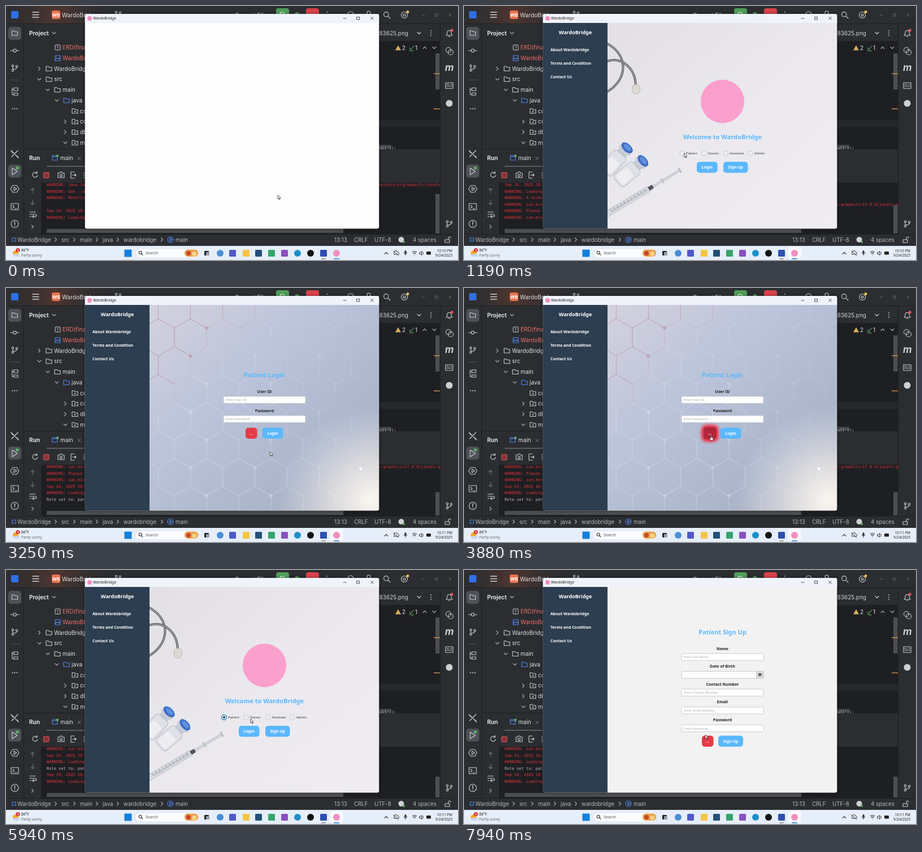
An HTML page for the animation above (8 s loop, 800 by 450 pixels).

```html
<!DOCTYPE html>
<html lang="en">
<head>
<meta charset="utf-8">
<title>WardoBridge demo</title>
<style>
html, body { margin: 0; width: 100%; height: 100%; overflow: hidden; background: #1e1f22; }
svg { display: block; width: 100vw; height: 100vh; }
text { white-space: pre; }
.ide { font-family: Inter, sans-serif; }
.app { font-family: "Noto Sans", "Open Sans", sans-serif; }
.mono { font-family: "DejaVu Sans Mono", monospace; font-size: 7px; }
</style>
</head>
<body>
<svg id="stage" viewBox="0 0 800 450"></svg>
<script>
const LOOP = 8000, NAME = "WardoBridge", BLUE = "#5bb8ff", GREY = "#ced0d6";

const rect = (x, y, w, h, fill, r = 0, more = "") =>
  `<rect x="${x}" y="${y}" width="${w}" height="${h}" rx="${r}" fill="${fill}" ${more}/>`;
const dot = (x, y, r, fill, more = "") => `<circle cx="${x}" cy="${y}" r="${r}" fill="${fill}" ${more}/>`;
const line = (d, color = GREY, w = 1.1, more = "") =>
  `<path d="${d}" fill="none" stroke="${color}" stroke-width="${w}" stroke-linecap="round" stroke-linejoin="round" ${more}/>`;
const text = (x, y, s, size, fill = "#dfe1e5", more = "") =>
  `<text x="${x}" y="${y}" font-size="${size}" fill="${fill}" ${more}>${s}</text>`;
const bold = (x, y, s, size, fill, more = "") => text(x, y, s, size, fill, 'font-weight="700" ' + more);
const centered = (x, y, s, size, fill) => bold(x, y, s, size, fill, 'text-anchor="middle"');
const group = (id, body, more = "") => `<g id="${id}" ${more}>${body}</g>`;

// Small interface icons, placed by their centre
const ring = (x, y, r, color = GREY) => dot(x, y, r, "none", `stroke="${color}" stroke-width="1.1"`);
const chevron = (x, y, dir = "right", color = "#a8abb2") => line({
  right: `M${x - 1.5} ${y - 3}l3 3l-3 3`, down: `M${x - 3} ${y - 1.5}l3 3l3-3`, up: `M${x - 3} ${y + 1.5}l3-3l3 3`
}[dir], color);
const dots = (x, y, vertical) => [-4, 0, 4].map(d => vertical ? dot(x, y + d, 0.9, GREY) : dot(x + d, y, 1.1, GREY)).join("");
const folder = (x, y, color = GREY) => line(`M${x - 5} ${y - 4}h4l1.5 1.7h4.5v6.3h-10z`, color);
const magnifier = (x, y, s, color = GREY) =>
  ring(x - s / 5, y - s / 5, s * 0.7, color) + line(`M${x + s * 0.35} ${y + s * 0.35}L${x + s} ${y + s}`, color);
const branch = (x, y) => ring(x - 3, y - 4, 1.7) + ring(x - 3, y + 4, 1.7) + ring(x + 4, y - 3, 1.7) +
  line(`M${x - 3} ${y - 2}v4M${x + 4} ${y - 1}q0 3-6 3`);

function ideFrame() {
  const panel = "#2b2d30", edge = "#1e1f22";
  let s = rect(0, 0, 800, 426, panel) + rect(0, 0, 260, 31, "url(#tint)") + rect(660, 62, 108, 191, edge) +
    rect(63, 313, 705, 91, edge) + rect(660, 202, 108, 12, "#26282e");
  s += line("M0 31.5H800M31.5 32V404M768.5 32V404M32 253.5H768M62.5 312V404M0 404.5H800", edge, 1);
  // Top bar
  s += rect(9, 9, 13, 13, "#2f6fe8", 2) + line("M47 11h11M47 15.5h11M47 20h11", GREY, 1.3) +
    rect(81, 8, 15, 15, "#e87450", 3) + centered(88.5, 19, "WB", 8, "#fff") + text(99, 19.5, NAME, 10.2) +
    branch(198, 15) + text(405, 19.5, "Current File", 10.2) + rect(478, 4, 23, 23, "#4f9e58", 4) +
    line("M485 15a4 4 0 1 1 4 4M485 12l4-1", "#fff") + dot(515, 15, 4, "#57965c") + rect(531, 4, 23, 23, "#d9414a", 4) +
    dots(568, 15, true) + ring(610, 15, 5) + ring(642, 12, 3) + magnifier(674, 16, 6) +
    ring(705, 16, 2) + ring(705, 16, 5.5) + dot(711, 10.5, 2.4, "#f2c55c") +
    line("M736 16h5M760 14h4v4h-4zM784 14l4 4m0-4l-4 4", "#696c72", 0.9);
  // Left strip
  s += rect(4, 37, 23, 23, "#4e5157", 5) + folder(15.5, 48) + ring(15.5, 79, 2.7) + line("M8 79h4.5M18.5 79h4.5") +
    branch(15, 110) + line("M8 131h15", "#4e5157") + line("M11 145v12h3M11 148h3M14 145h7v5h-7zM14 154h7v4h-7z") + dots(15.5, 182) +
    line("M10 257l11 11M21 256l-11 11M9 256l3 4M20 266l2 3", GREY, 1.4) + rect(4, 281, 23, 23, "#4e5157", 5) +
    line("M11 287l9 6l-9 6z") + dot(20, 287, 2.8, "#5fad65") +
    line("M12 318h7l4 6l-4 6h-7l-4-6zM14 321l5 3l-5 3z") + line("M9 350h13v11H9zM12 353l2.5 2.5l-2.5 2.5M16 359h3") +
    ring(15.5, 386, 6.5) + line("M15.5 382v5M15.5 389.5v.1", GREY, 1.4);
  // Right strip
  s += line("M779 52h11q-2-2-2-5a3.5 3.5 0 0 0-7 0q0 3-2 5M783 54h3") + dot(789, 43, 2.6, "#e55765") +
    ring(783, 78, 4.5) + ring(787, 82, 4.5) + bold(777, 115, "m", 17, GREY, 'font-style="italic"') +
    line("M778 136h13v10h-13zM780 139h4M780 142h9M787 139h2") + dot(784.5, 172.5, 6, GREY) + branch(784, 386);
  // Project tree
  s += bold(41, 51.5, "Project", 10) + chevron(85, 48, "down");
  s += rect(87, 69, 9, 9, "none", 1, `stroke="${GREY}"`) + text(89.5, 76.5, "?", 7) + text(100, 77, "ERD(final).mdj", 10, "#ef6f69") +
    line("M87 88h9v9h-9zM87 95l3-3l3 2l3-3", "#548af7") + text(100, 96, NAME + ".png", 10, "#ef6f69");
  const rows = [[76, NAME, "right"], [76, "src", "down"], [91, "main", "down"], [107, "java", "down"],
    [122, "config"], [122, "controller", "right"], [122, "db", "right"], [122, "model", "down"]];
  rows.forEach(([x, label, open], i) => {
    const y = 111 + i * 18.75;
    s += folder(x, y, label == "java" ? "#548af7" : GREY) + text(x + 9, y + 3.7, label, 10) + (open ? chevron(x - 17, y, open) : "");
    if (x == 122) s += dot(x, y + 1, 1.2, GREY);
  });
  // Editor edge
  s += text(712, 51.7, "1758683625.png", 10, GREY, 'text-anchor="end"') + chevron(731, 48, "down", GREY) + dots(752, 48, true) +
    `<path d="M689 78.5l5-9l5 9z" fill="#d6ae58"/>` + text(701, 78, "2", 10) + line("M714 74l2.5 3l5-6M714 79q2-2 3 0t4 0", "#5fad65") +
    text(724, 78, "1", 10) + chevron(741, 74, "up") + chevron(758, 74, "down") + rect(760, 84, 7.5, 64, "#4d4e51") +
    rect(757, 119, 11, 1.6, "#b98a4e") + rect(757, 181.5, 11, 1.6, "#b98a4e") + rect(655, 246, 27, 7, "#43454a") +
    text(661, 254, "ull'));", 9, "#bcbec4", 'class="mono"') + rect(655, 254, 113, 6, panel);
  // Run panel
  s += bold(41, 273, "Run", 10) + line("M82 265h9v8h-9zM82 267h9", "#548af7") + dot(91, 265.5, 2.2, "#5fad65") +
    text(96, 273, "main", 10) + line("M127 267.5l5 5m0-5l-5 5", "#8c8f94", 0.9) + rect(72, 283, 110, 2, "#5a5d63") +
    line("M55 296a4.5 4.5 0 1 0 1 4M55 293v3.5h-3.5") + rect(66.5, 295, 9.5, 9.5, "#8a3238", 1, 'stroke="#db5c5c"') +
    line("M92 296h3l1-2h3l1 2h3v8H92z") + ring(97.5, 300, 2) + line("M121 294h-6v11h6M118 299.5h6M122 297.5l2 2l-2 2") + dots(138, 299.5, true);
  s += line("M47 331v-8m-3 3l3-3l3 3M47 344v8m-3-3l3 3l3-3", "#6f737a") +
    line("M42 365h10M42 369h9q3 0 3 2t-3 2h-3M42 373h3M49 371l-2 2l2 2") + chevron(47, 391);
  // Status bar
  s += line("M11 411h6v6h-6z", "#548af7");
  [[20, NAME], [98, "src"], [131, "main"], [171, "java"], [208, NAME.toLowerCase()], [300, "main"],
    [581, "13:13"], [616, "CRLF"], [652, "UTF-8"], [720, "4 spaces"]].forEach(([x, label]) => s += text(x, 417.5, label, 9.7, "#b4b8bf"));
  [88, 121, 161, 198, 276].forEach(x => s += chevron(x, 414));
  s += ring(291, 414, 5, "#548af7") + line("M290 411.5l4 2.5l-4 2.5z", "#548af7") + dot(699.5, 414, 5, GREY) +
    dot(704, 418, 2, "#5fad65") + line("M777 414h8v5h-8zM783 414v-3a2 2 0 0 1 4 0");
  return group("ide", s, 'class="ide"');
}

const stamp = "Sep 24, 2025 10:10:42 PM com.sun", loading = "WARNING: Loading FXML";
const log = ["WARNING: java.lang.System", "WARNING: Use --enable", "WARNING: Restricted", "", stamp, loading,
  "WARNING: A terminally", "WARNING: sun.misc", "WARNING: Please", "WARNING: sun.misc", stamp, loading,
  "Role set to: patient", stamp, loading];

function consolePane() {
  const tail = { 0: "ository/org/openjfx/javafx", 7: "x-graphics/17.0.6/javafx-g" };
  const lines = log.map((s, i) => {
    const y = 319 + i * 11.5, color = s.startsWith("Role") ? "#bcbec4" : "#e2333d";
    return text(72, y, s, 7, color) + (tail[i] ? text(659, y, tail[i], 7, color) : "");
  }).join("");
  return `<g clip-path="url(#console)" class="mono">${group("log", lines)}</g>` +
    rect(72, 395, 525, 7, "#4d4e51") + rect(760, 333, 7.5, 70, "#4d4e51", 0, 'id="thumb"');
}

function taskbar() {
  let s = rect(0, 425, 800, 25, "#e6eef9") + dot(17, 438, 5, "#f5a623") + rect(13, 439, 11, 5, "#c9d6e8", 2.5) +
    dot(21, 432.5, 3.6, "#d13438") + centered(21, 434.7, "1", 5.5, "#fff") + text(27, 435.3, "86°F", 6.5, "#222") +
    text(27, 443.5, "Partly sunny", 6.3, "#666") + rect(209.5, 431.5, 13, 13, "#1480dc", 1) +
    rect(229, 430, 112, 16, "#fbfcfe", 8, 'stroke="#d5dbe6" stroke-width=".6"') + magnifier(238.5, 437.5, 3.6, "#333") +
    text(247, 440.4, "Search", 7, "#555") + rect(316, 431.5, 24, 12.5, "#e9a04c", 6) + dot(323, 438, 4, "#c8452e") + dot(333, 439, 4, "#f4d58a") +
    rect(351, 434, 8, 8, "#222", 1) + rect(354, 436, 6, 6, "#9aa0aa", 1) + rect(573.5, 427, 23, 21, "#f8fafd", 4, 'id="active"');
  ["379 #4b8fd8", "401 #5059c9 sq", "425 #f6c445 sq", "447 #234f78 sq", "470 #36a46a sq", "493 #8a4fc0 sq", "516 #1c8fc9",
    "539 #111", "562 #2e4fae sq", "585 #f08fc0"].forEach(item => {
    const [x, color, square] = item.split(" ");
    s += square ? rect(x - 6, 432, 12, 12, color, 1.5) : dot(x, 438, 6, color);
  });
  s += rect(558, 447, 8, 1.6, "#8b8f98", 0.8) + rect(580, 447, 10, 1.6, "#2d7dd2", 0.8) + chevron(673, 438, "up", "#333") +
    line("M687 440h7a2 2 0 0 0-1-4a3 3 0 0 0-6 1zM686 434l9 8", "#222", 0.9) + rect(705.5, 433, 3, 6, "#333", 1.5) +
    line("M704 437q3 6 6 0M707 440v2", "#333", 0.8) + line("M719.5 436q3.5-3 7 0M721 438.3q2-1.8 4 0M723 440.6v.1", "#222") +
    line("M732 436.5h1.5l2-2v7l-2-2H732zM737.5 435.5q2 2.5 0 5", "#222", 0.9) + rect(744, 435, 8, 5.5, "#222", 1);
  s += text(790, 435.5, "10:10 PM", 6.3, "#222", 'id="clock" text-anchor="end"') + text(790, 443.7, "9/24/2025", 6.3, "#222", 'text-anchor="end"');
  return `<g class="app">${s}</g>`;
}

const button = (x, y, w, label, fill = BLUE) => rect(x, y, w, 19.5, fill, 5) + centered(x + w / 2, y + 12.3, label, 7, "#fff");
const field = (y, label, hint) => centered(457.5, y - 6.3, label, 7, "#222") +
  rect(385, y, 145, 12.3, "#fff", 1.5, 'stroke="#bfc1c6" stroke-width=".8"') + text(389, y + 8.3, hint, 5.8, "#a9abb0");
const hoverButton = (id, x, y, w, label, fill, glow) => group(id,
  rect(x - 5, y - 5, w + 10, 30, glow, 9, 'filter="url(#glow)"') + rect(x - 1, y - 1, w + 2, 21.5, fill, 5) +
  centered(x + w / 2, y + 12.3, label, 7, "#fff"));

// A glass vial hanging from the centre of its cap
const vial = (x, y, angle) => `<g transform="translate(${x} ${y}) rotate(${angle})">` +
  rect(-14, 14, 28, 44, "#dfe1e8", 6, 'stroke="#b4b8c2"') + rect(-10.5, 28, 21, 26, "#eeeef2", 4) +
  rect(-9, 2, 18, 13, "#c3c7d0", 2) + `<ellipse cy="4" rx="12.5" ry="7" fill="#c9ced8"/>` +
  `<ellipse cy="-1" rx="12" ry="7" fill="#3c6fc6"/><ellipse cy="-2" rx="8" ry="4" fill="#5f8fdd"/></g>`;

function homePage() {
  let s = rect(254, 30, 406, 364, "url(#photo)");
  const tubes = ["M250 65C290 83 294 130 250 154", "M250 99C278 88 303 109 304 141"];
  tubes.forEach(d => s += line(d, "#626469", 4) + line(d, "#a9abb0", 1.3));
  s += rect(297.5, 139, 14, 17, "#dcd8d3", 6, 'stroke="#bebab6"') + vial(288, 252, 43) + vial(316, 275, 50);
  s += `<g transform="translate(254 368) rotate(-31)">` + rect(-8, -5, 95, 10, "#d9dbe1", 2, 'stroke="#b0b4bd" stroke-width=".8"') +
    rect(8, -2, 75, 4, "#c3c6ce") + line(Array.from({ length: 11 }, (_, i) => `M${8 + i * 7}-4v4`).join(""), "#777c86", 0.6) +
    rect(85, -3.5, 9, 7, "#50545c", 1) + rect(94, -2.5, 55, 5, "#cdd0d8") + rect(112, -5, 3, 10, "#bfc3cc", 1) + rect(148, -5, 3, 10, "#b9bdc7", 1) + "</g>";
  s += dot(457.5, 169, 38.5, "#fb9fcd") + centered(457.5, 236.4, "Welcome to " + NAME, 11, BLUE);
  [[386, "Patient"], [425, "Doctor"], [463.5, "Assistant"], [507, "Admin"]].forEach(([x, label]) =>
    s += dot(x, 261, 4.2, "#eeeef0", 'stroke="#b9bac0" stroke-width=".8"') + text(x + 7, 263.2, label, 5.9, "#333"));
  s += dot(386, 261, 4.5, "none", 'id="focus" stroke="#1c96c9" stroke-width="1.3"') + dot(386, 261, 2, "#333", 'id="picked"');
  s += button(412, 276, 36.5, "Login") + button(459, 276, 43.5, "Sign Up") +
    hoverButton("hoverLogin", 412, 276, 36.5, "Login", "#3d97dc", "#a4e6f8") +
    hoverButton("hoverSignup", 459, 276, 43.5, "Sign Up", "#3d97dc", "#a4e6f8");
  return group("home", s);
}

function loginPage() {
  let hex = "";
  for (let row = 0; row < 8; row++) for (let col = 0; col < 8; col++) {
    const x = 241 + col * 57 + (row % 2 ? 28.5 : 0), y = 38 + row * 49.5;
    const warm = x + y < 460, alpha = warm ? 0.5 : Math.max(0.1, 0.3 - Math.abs(x - y - 60) / 1500);
    const color = warm ? "#b9849a" : "#eef2fa";
    hex += line(`M${x} ${y - 33}l28.5 16.5v33l-28.5 16.5l-28.5-16.5v-33z`, color, 0.8, `opacity="${alpha}"`);
    if ((row + col) % 2 == 0) hex += dot(x, y + 33, 3, color, `opacity="${alpha}"`);
  }
  return group("login", rect(254, 30, 406, 364, "url(#sky)") + `<g clip-path="url(#page)">${hex}</g>` +
    rect(254, 30, 406, 364, "url(#flare)") + dot(628, 320, 2.6, "#fff") +
    centered(457.5, 157.7, "Patient Login", 11, BLUE) + field(192, "User ID", "Enter User ID") + field(226, "Password", "Enter Password") +
    button(424, 247.5, 20.5, "...", "#e63946") + button(453.5, 247.5, 37, "Login") +
    hoverButton("hoverBack", 425, 247.5, 20.5, "...", "#b3263a", "#ee2f42"));
}

function signupPage() {
  return group("signup", rect(254, 30, 406, 364, "#f2f2f2") + centered(457.5, 114, "Patient Sign Up", 11, BLUE) +
    field(148, "Name", "Enter Full Name") + field(179.5, "Date of Birth", "") + field(211, "Contact Number", "Enter Contact Number") +
    field(242.7, "Email", "Enter Email Address") + field(274.3, "Password", "Enter Password") +
    rect(517.5, 179.5, 12.5, 12.3, "#dedede", 1.5, 'stroke="#bfc1c6" stroke-width=".8"') +
    rect(521, 183, 5.5, 5, "#444") + line("M521 185h5.5M521 186.8h5.5", "#ccc", 0.5) +
    button(421, 293.5, 20.5, "...", "#e63946") + button(450, 293.5, 44, "Sign Up"));
}

function appWindow() {
  const side = rect(139.5, 30, 114.5, 365, "#2c3e50") + centered(197, 50.4, NAME, 9, "#fff") +
    bold(153, 79.5, "About Wardobridge", 7, "#fff") + bold(153, 103.8, "Terms and Condition", 7, "#fff") + bold(153, 128, "Contact Us", 7, "#fff");
  return rect(139, 14, 522, 381, "#000", 5, 'opacity=".45" filter="url(#glow)"') +
    `<g class="app" clip-path="url(#window)">` + rect(139.5, 14, 521, 381, "#fdfdfd") + rect(139.5, 14, 521, 16, "#f0f3fa") +
    dot(148, 22, 4, "#f08fc0") + text(154, 24.4, NAME, 6.6, "#222") +
    line("M597 22h5M621 19.5h4.5v4.5H621zM645.7 19.5l4.6 4.6m0-4.6l-4.6 4.6", "#222", 0.8) +
    group("content", homePage() + loginPage() + signupPage() + side) + "</g>";
}

const stop = (at, color, alpha = 1) => `<stop offset="${at}" stop-color="${color}" stop-opacity="${alpha}"/>`;
const clip = (id, shape) => `<clipPath id="${id}">${shape}</clipPath>`;
const defs = `<defs>
<radialGradient id="tint" gradientUnits="userSpaceOnUse" cx="88" cy="15" r="110">${stop(0, "#5c392f", 0.8)}${stop(1, "#2b2d30", 0)}</radialGradient>
<linearGradient id="photo" x2="1" y2="1">${stop(0, "#e2e0e5")}${stop(0.5, "#ebe9ee")}${stop(1, "#efedf1")}</linearGradient>
<linearGradient id="sky" x2="1" y2="1">${stop(0, "#d3d2df")}${stop(0.4, "#bac3d9")}${stop(0.75, "#abb5ca")}${stop(1, "#b5b5bd")}</linearGradient>
<radialGradient id="flare" gradientUnits="userSpaceOnUse" cx="645" cy="375" r="165">${stop(0, "#fffaf2", 0.95)}${stop(0.4, "#f1edeb", 0.65)}${stop(1, "#dfe3ec", 0)}</radialGradient>
<filter id="glow" x="-40%" y="-40%" width="180%" height="180%"><feGaussianBlur stdDeviation="2.6"/></filter>
${clip("console", rect(63, 313, 705, 66, "#000"))}${clip("page", rect(254, 30, 406, 364, "#000"))}${clip("window", rect(139.5, 14, 521, 380.5, "#000", 4))}
</defs>`;

const pointer = group("cursor",
  `<path id="arrow" d="M0 0v7l1.7-1.5l1.2 2.6l1.2-.6l-1.2-2.5h2.2z" fill="#fff" stroke="#111" stroke-width=".7"/>` +
  `<path id="hand" d="M-.8 .6q.8-1.2 1.6 0v3l2.6 .6q1 .3 .8 1.4l-.7 3.2h-4l-2.4-3.2q.2-1 1.3-.4l.8 .7z" fill="#fff" stroke="#111" stroke-width=".7"/>`);

const stage = document.getElementById("stage");
stage.innerHTML = defs + ideFrame() + consolePane() + taskbar() + appWindow() + pointer;
const el = id => document.getElementById(id);
const show = (id, on) => el(id).style.display = on ? "" : "none";
const between = (t, a, b) => t >= a && t < b;

// Cursor tip: time, x, y
const path = [[0, 481, 335], [350, 479, 332], [1000, 390, 261], [1750, 388, 261], [2200, 430, 286], [2450, 432, 288],
  [2690, 500, 321], [2950, 498, 320], [3550, 437, 261], [4450, 437, 261], [5150, 388, 261], [5700, 388, 261],
  [5940, 433, 264], [6250, 480, 286], [6600, 484, 288], [7250, 522, 152], [7400, 522, 152], [7940, 427, 292], [8000, 427, 292]];

function cursorAt(t) {
  const i = path.findIndex(p => p[0] > t), [t0, x0, y0] = path[i - 1], [t1, x1, y1] = path[i];
  const u = (t - t0) / (t1 - t0), k = u * u * (3 - 2 * u);
  return [x0 + (x1 - x0) * k, y0 + (y1 - y0) * k];
}

function draw() {
  const t = performance.now() % LOOP;
  const onLogin = between(t, 2900, 4140), onSignup = t >= 6700;
  show("content", t >= 400);
  show("active", t >= 400);
  show("home", !onLogin && !onSignup);
  show("login", onLogin);
  show("signup", onSignup);
  show("picked", between(t, 1760, 2900) || between(t, 5550, 6700));
  show("focus", between(t, 1760, 2350) || between(t, 5550, 6350));
  const hovers = { hoverLogin: between(t, 2130, 2900), hoverBack: between(t, 3480, 4140), hoverSignup: between(t, 6160, 6700) };
  for (const id in hovers) show(id, hovers[id]);
  const pointing = Object.values(hovers).some(Boolean);
  show("hand", pointing);
  show("arrow", !pointing);

  // The scroll thumb shrinks as the log grows
  const scrolled = t < 400 ? 0 : t < 2560 ? 4 : t < 4500 ? 7 : 9;
  const thumbHeight = 700 / (10 + scrolled);
  el("log").setAttribute("transform", `translate(0 ${-11.5 * scrolled})`);
  el("thumb").setAttribute("y", 403 - thumbHeight);
  el("thumb").setAttribute("height", thumbHeight);
  el("clock").textContent = t < 3000 ? "10:10 PM" : "10:11 PM";
  el("cursor").setAttribute("transform", `translate(${cursorAt(t)})`);
  requestAnimationFrame(draw);
}
draw();
</script>
</body>
</html>
```
